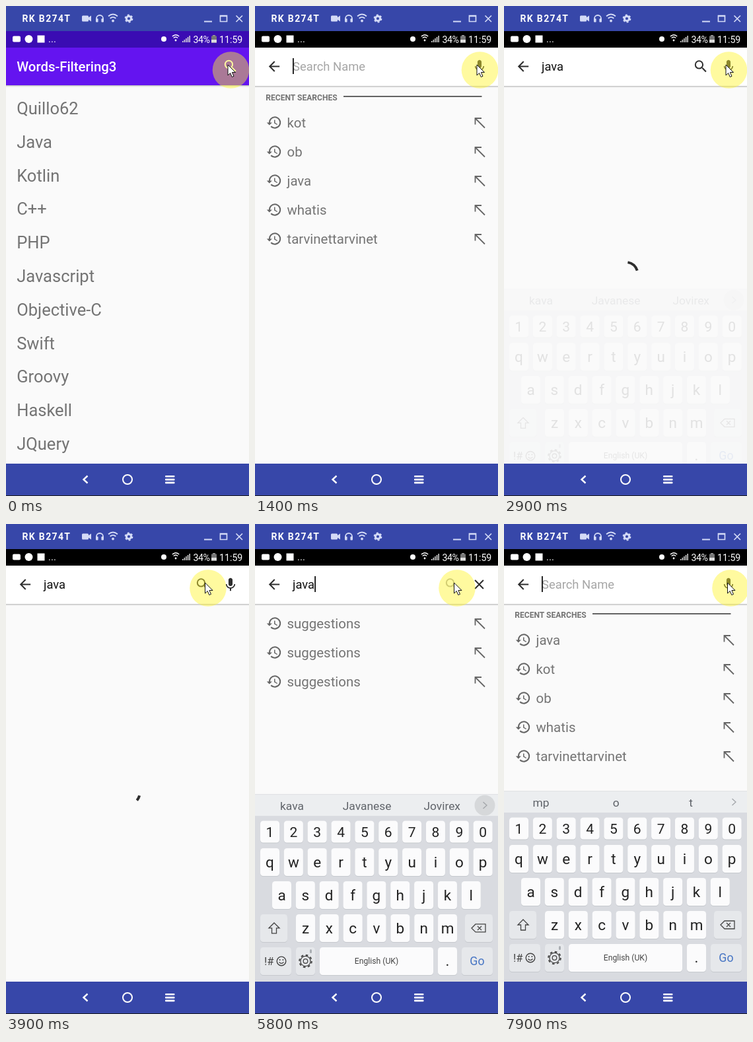
These frames come from a looping animation (368 px wide and 742 px high, 8000 ms). An HTML page:

```html
<!DOCTYPE html>
<html lang="en">
<head>
<meta charset="utf-8">
<style>
html, body { margin: 0; width: 100%; height: 100%; overflow: hidden; background: #fafafa; }
svg { display: block; width: 368px; height: 742px; font-family: Roboto, sans-serif; }
text { white-space: pre; }
</style>
</head>
<body>
<svg id="stage" viewBox="0 0 368 742"></svg>
<script>
const LOOP = 8000;
const GREY = '#747474', DARK = '#2e2e2e', BLUE = '#3747a9', PALE = '#d3daf6';
const GLYPH = {
  search: 'M15.5 14h-.79l-.28-.27A6.47 6.47 0 0 0 16 9.5 6.5 6.5 0 1 0 9.5 16c1.61 0 3.09-.59 4.23-1.57l.27.28v.79l5 4.99L20.49 19zm-6 0C7.01 14 5 11.99 5 9.5S7.01 5 9.5 5 14 7.01 14 9.5 11.99 14 9.5 14z',
  back: 'M20 11H7.83l5.59-5.59L12 4l-8 8 8 8 1.41-1.41L7.83 13H20z',
  close: 'M19 6.41 17.59 5 12 10.59 6.41 5 5 6.41 10.59 12 5 17.59 6.41 19 12 13.41 17.59 19 19 17.59 13.41 12z',
  mic: 'M12 14c1.66 0 3-1.34 3-3V5c0-1.66-1.34-3-3-3S9 3.34 9 5v6c0 1.66 1.34 3 3 3zm5.3-3c0 3-2.54 5.1-5.3 5.1S6.7 14 6.7 11H5c0 3.41 2.72 6.23 6 6.72V21h2v-3.28c3.28-.48 6-3.3 6-6.72z',
  history: 'M13 3a9 9 0 0 0-9 9H1l3.89 3.89.07.14L9 12H6a7 7 0 1 1 2.06 4.94l-1.42 1.42A9 9 0 1 0 13 3zm-1 5v5l4.28 2.54.72-1.21-3.5-2.08V8z'
};

// Markup helpers
const rect = (x, y, w, h, fill, r = 0) => `<rect x="${x}" y="${y}" width="${w}" height="${h}" rx="${r}" fill="${fill}"/>`;
const text = (x, y, size, fill, str, extra = '') => `<text x="${x}" y="${y}" font-size="${size}" fill="${fill}" ${extra}>${str}</text>`;
const middle = (x, y, size, fill, str) => text(x, y, size, fill, str, 'text-anchor="middle"');
const line = (d, color, w = 1.5, extra = '') => `<path d="${d}" fill="none" stroke="${color}" stroke-width="${w}" ${extra}/>`;
const disc = (x, y, r, fill) => `<circle cx="${x}" cy="${y}" r="${r}" fill="${fill}"/>`;
const ring = (x, y, r, color, w, extra = '') => `<circle cx="${x}" cy="${y}" r="${r}" fill="none" stroke="${color}" stroke-width="${w}" ${extra}/>`;
const group = (id, body) => `<g id="${id}">${body}</g>`;
const icon = (name, x, y, fill) => `<path transform="translate(${x} ${y}) scale(1.02) translate(-12 -12)" d="${GLYPH[name]}" fill="${fill}"/>`;
const shadow = y => rect(0, y, 368, 1, '#c4c4c4') + rect(0, y + 1, 368, 1, '#e0e0e0') + rect(0, y + 2, 368, 1, '#f1f1f1');
const wifi = (x, y, r, color, w) => line(`M${x - r} ${y - r * .57}q${r}-${r * .85} ${r * 2} 0M${x - r * .62} ${y - r * .1}q${r * .62}-${r * .55} ${r * 1.24} 0`, color, w) +
  disc(x, y + 3, w, color);

const words = list => list.map((w, i) => text(16.2, 164 + 50.8 * i, 25.5, GREY, w)).join('');

const rows = (list, top) => list.map((w, i) => {
  const y = top + 44 * i;
  return icon('history', 29, y, '#666') + text(48.5, y + 7.5, 20.45, GREY, w) +
    line(`M333.5 ${y + 3}v-9.5h9.5M333.5 ${y - 6.5}l14.5 14.5`, '#666', 1.8);
}).join('');

const recent = list => text(16.2, 142, 12.1, '#737373', 'RECENT SEARCHES', 'font-weight="700"') +
  rect(134, 135.2, 209.5, 1.5, '#333') + rows(list, 175.5);

function keyboard() {
  const cap = (x, y, w, h, fill = '#fbfbfc') => rect(x, y + 1, w, h, '#c6c9ce', 4.5) + rect(x, y, w, h, fill, 4.5);
  const soft = '#e6e8eb', ink = '#222', thin = '#444';
  const keys = (chars, x, y, h, size) => [...chars].map((c, i) => {
    const cx = x + 35.85 * i;
    return cap(cx - 14.5, y - h / 2, 29, h) + middle(cx, y + size * .36, size, ink, c);
  }).join('');
  return rect(0, 404, 368, 300, '#d9dbe0') + rect(0, 404, 368, 33, '#eceef0') + rect(0, 404, 368, 1, '#e0e2e4') +
    group('plainStrip', ['mp', 'o', 't'].map((w, i) => middle(56 + 113.6 * i, 428, 17.4, '#60646a', w)).join('')) +
    group('javaStrip', ['kava', 'Javanese', 'Jovirex'].map((w, i) => middle(56 + 113.6 * i, 428, 17.4, '#60646a', w)).join('') +
      disc(348, 421, 15.5, '#d6d8da')) +
    line('M345.5 416l5.5 5-5.5 5', '#a2a5a9', 1.3) +
    keys('1234567890', 22.5, 461, 33, 21) + keys('qwertyuiop', 22.5, 507, 42, 22.5) +
    keys('asdfghjkl', 40.5, 557, 42, 22.5) + keys('zxcvbnm', 76.5, 607, 42, 22.5) +
    cap(8, 586, 41, 42, soft) + line('M29 599l8 8h-4.5v8h-7v-8H21z', thin, 1.3) +
    cap(318, 586, 42, 42, soft) + line('M328 607l6-6h15v12h-15zM337 604l6 6M343 604l-6 6', thin, 1.3) +
    cap(8, 636, 47, 42, soft) + text(14, 663, 16.5, thin, '!#') + ring(40, 657, 6.8, thin, 1.4) +
    disc(37.6, 655, 1, thin) + disc(42.4, 655, 1, thin) + line('M36.5 658.5q3.5 4 7 0', thin, 1.2) +
    cap(62, 636, 29, 42, soft) + ring(76.5, 657, 3.3, thin, 1.3) + ring(76.5, 657, 7.6, thin, 1.3) +
    ring(76.5, 657, 9.3, thin, 2, 'stroke-dasharray="3.6 3.7"') + rect(83, 639, 3, 6, '#aaaeb3', 1.5) +
    cap(98, 636, 172, 42) + middle(184, 661, 12.2, thin, 'English (UK)') +
    cap(277, 636, 29, 42) + middle(291.5, 664, 22.5, ink, '.') +
    cap(313, 636, 47, 42, soft) + middle(336.5, 663, 17.8, '#4876c4', 'Go');
}

const mainScreen = words(['Quillo62', 'Java', 'Kotlin', 'C++', 'PHP', 'Javascript', 'Objective-C', 'Swift', 'Groovy', 'Haskell', 'JQuery']) +
  shadow(120) + rect(0, 63, 368, 57, '#6414f0') +
  text(16.2, 99, 20.4, '#fff', 'Words-Filtering3', 'font-weight="500"') + icon('search', 340, 91, '#fff');

const searchScreen = rect(0, 63, 368, 640, '#fafafa') + rect(0, 63, 368, 58, '#fff') + shadow(121) +
  icon('back', 29, 91.5, DARK) +
  group('hint', text(57, 98, 18.4, '#a6a6a6', 'Search Name')) +
  text(57, 98, 18.4, '#111', '', 'id="query"') +
  group('caret', rect(0, 79, 1.8, 24, '#111')) +
  group('searchIcon', icon('search', 298, 91.5, DARK)) +
  group('micIcon', icon('mic', 340, 92, DARK)) +
  group('closeIcon', icon('close', 339.5, 91.5, DARK)) +
  group('recentOld', recent(['kot', 'ob', 'java', 'whatis', 'tarvinettarvinet'])) +
  group('recentNew', recent(['java', 'kot', 'ob', 'whatis', 'tarvinettarvinet'])) +
  group('suggestions', rows(Array(3).fill('suggestions'), 150.5)) +
  group('results', words(['Java', 'Javascript'])) +
  line('', DARK, 4, 'id="spinner"');

const statusIcons = rect(10, 45.5, 12, 9, '#fff', 2) + disc(34.5, 50, 6, '#fff') + rect(47.5, 44.5, 11, 11, '#fff') +
  text(64, 55, 15, '#fff', '...') + disc(239, 50, 4, '#fff') + wifi(257, 49, 5.2, '#fff', 1.4) +
  [0, 1, 2, 3, 4].map(i => rect(267 + 2.6 * i, 53 - 2 * i, 1.5, 2 + 2 * i, '#ddd')).join('') +
  text(283.5, 55.5, 14.2, '#fff', '34%', 'letter-spacing="-.5"') + rect(313, 44, 4, 2, '#999') + rect(311, 45.5, 8, 10, '#777') + rect(311, 51, 8, 4.5, '#ddd') +
  text(323, 55.5, 14.2, '#fff', '11:59');

const titleBar = rect(0, 0, 368, 38, BLUE) +
  text(24.5, 24, 14, '#fff', 'RK B274T', 'font-weight="700" letter-spacing="1.35"') +
  rect(115, 14.5, 10, 9, PALE, 1.5) + `<path d="M124 18l5-3.5v9l-5-3.5z" fill="${PALE}"/>` +
  line('M137 21v-2a5 5 0 0 1 10 0v2', PALE, 1.8) + rect(136, 19, 3.6, 5.5, PALE, 1) + rect(144.4, 19, 3.6, 5.5, PALE, 1) +
  wifi(162, 19.5, 7, PALE, 1.9) +
  ring(186, 19, 3.6, PALE, 3) + ring(186, 19, 5.4, PALE, 2, 'stroke-dasharray="2.9 2.75"') +
  rect(300, 22.5, 12, 2, PALE) + line('M324.5 14.5h10v9h-10zM324.5 15.5h10', PALE, 1.7) + line('M348.5 14.5l9.5 9.5m0-9.5l-9.5 9.5', PALE, 1.7);

const navBar = rect(0, 693, 368, 49, BLUE) + rect(0, 741, 368, 1, '#1c1c1c') +
  line('M123.5 711.5l-6 5.5 6 5.5', '#fff', 2.4) + ring(184, 717, 7, '#fff', 2) +
  [711, 715.8, 720.6].map(y => rect(241, y, 14.5, 2.6, '#fff', 1)).join('');

const pointer = disc(0, 0, 27.8, 'rgba(255,244,44,.45)') +
  '<path d="M-4.500-8v16l3.700-3.500 2.600 6 2.700-1.200-2.600-5.800h5.100z" fill="#fff" stroke="#111"/>';

document.getElementById('stage').innerHTML = rect(0, 0, 368, 742, '#fafafa') + mainScreen + rect(0, 38, 368, 25, '#3a0cb3') +
  group('search', searchScreen) + group('statusBlack', rect(0, 38, 368, 25, '#000')) +
  group('keyboard', keyboard()) + titleBar + statusIcons + navBar + group('pointer', pointer);

const ui = Object.fromEntries([...document.querySelectorAll('[id]')].map(el => [el.id, el]));
const show = (name, alpha) => {
  ui[name].style.display = alpha > 0 ? '' : 'none';
  ui[name].setAttribute('opacity', +alpha);
};
const move = (name, x, y) => ui[name].setAttribute('transform', `translate(${x} ${y})`);

// Motion helpers
const ramp = (t, from, to) => Math.min(1, Math.max(0, (t - from) / (to - from)));
const smooth = p => p * p * (3 - 2 * p);
const easeOut = p => 1 - (1 - p) ** 3;
const within = (t, from, to) => t >= from && t < to;

// Eased trim of the indeterminate spinner over half a cycle, solved by bisection
function trim(x) {
  let lo = 0, hi = 1, s;
  for (let i = 0; i < 20; i++) {
    s = (lo + hi) / 2;
    const bx = 1.2 * (1 - s) ** 2 * s + .6 * (1 - s) * s * s + s ** 3;
    if (bx < x) lo = s; else hi = s;
  }
  return smooth(s);
}

function spinnerPath(ms) {
  const cycle = ms / 1333, p = cycle % 1;
  const base = -19 + ms * .13 + 90 * p + 360 * Math.floor(cycle);
  const start = base + 270 * trim(ramp(p, .5, 1));
  const end = base + 270 * trim(ramp(p, 0, .5)) + 12;
  const at = deg => {
    const a = deg * Math.PI / 180;
    return `${184 + 18.7 * Math.sin(a)} ${406.5 - 18.7 * Math.cos(a)}`;
  };
  return `M${at(start)}A18.7 18.7 0 ${end - start > 180 ? 1 : 0} 1 ${at(end)}`;
}

function draw(t) {
  const open = easeOut(ramp(t, 580, 900));
  show('search', open);
  show('statusBlack', open);
  move('search', 0, 45 * (1 - open));

  const typed = [1950, 2150, 2350, 2500].filter(k => t >= k).length;
  const query = t < 7800 ? 'java'.slice(0, typed) : '';
  const loading = within(t, 2751, 4800), idle = within(t, 2751, 5500);
  ui.query.textContent = query;
  show('hint', query === '');
  show('micIcon', query === '' || idle);
  show('closeIcon', query !== '' && !idle);
  show('searchIcon', t < 2751 || t >= 7800 ? 0 : 1 - ramp(t, 5500, 6000));

  const edit = [950, 1950, 2150, 2350, 2500, 5600, 7800].filter(k => t >= k).pop();
  show('caret', edit && !idle && Math.floor((t - edit) / 500) % 2 === 0);
  move('caret', [57, 61.5, 71.6, 80.3, 90.2][query.length], 0);

  show('recentOld', t < 1950 ? ramp(t, 850, 1300) : 0);
  move('recentOld', 0, t < 1500 ? 1 : 0);
  show('recentNew', t >= 7800);
  show('suggestions', within(t, 1950, 2751) || within(t, 5500, 7800));
  show('results', within(t, 4800, 5500));
  show('spinner', loading);
  if (loading) ui.spinner.setAttribute('d', spinnerPath(t - 2751));

  const rise = t < 5000 ? ramp(t, 1520, 1790) : ramp(t, 5650, 5920);
  const fall = t < 5000 ? ramp(t, 2800, 2950) : 0;
  show('keyboard', Math.min(1, rise * 2.5) * (1 - fall) ** 2);
  move('keyboard', 0, 58 * ((1 - rise) ** 3 + fall ** 2.2));
  const java = within(t, 2600, 7800);
  show('javaStrip', java);
  show('plainStrip', !java);

  const sweep = ramp(t, 6550, 6800);
  const x = 340.5 - 34.5 * smooth(ramp(t, 3350, 3900)) + 28 * smooth(sweep) +
    7.5 * smooth(ramp(t, 7050, 7200)) + 1.5 * ramp(t, 7400, 7600);
  move('pointer', x, 97 - 14 * Math.sin(Math.PI * sweep));
}

function frame() {
  draw(performance.now() % LOOP);
  requestAnimationFrame(frame);
}
frame();
</script>
</body>
</html>
```
